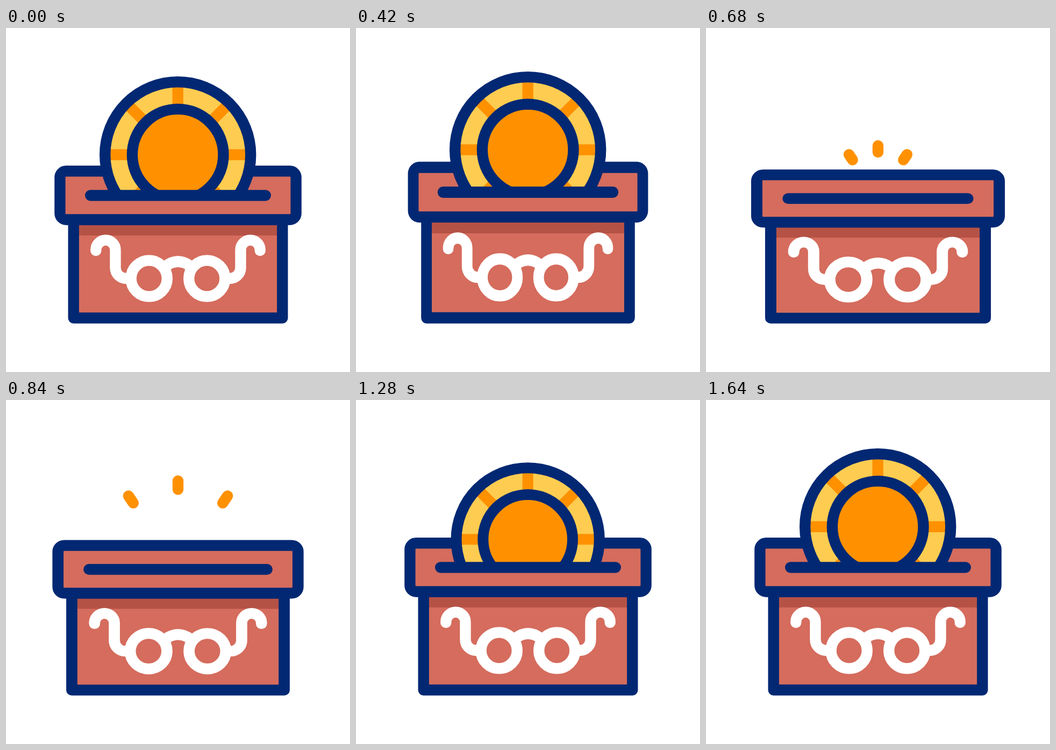
These frames come from a looping animation (640 px wide and 640 px high, 2.08 s). An HTML page with a canvas:

```html
<!DOCTYPE html>
<html lang="en">
<head>
<meta charset="utf-8">
<title>Donation box</title>
<style>
html, body { margin: 0; width: 100%; height: 100%; overflow: hidden; background: #fff; }
canvas { display: block; width: 640px; height: 640px; }
</style>
</head>
<body>
<canvas id="stage" width="640" height="640"></canvas>
<script>
const ctx = document.getElementById('stage').getContext('2d');
const LOOP = 2080, STEP = 20;
const NAVY = '#022873', RED = '#d56c5d', SHADE = '#b55246', ORANGE = '#ff9100', YELLOW = '#fecc50';
const MID = 320, BASE = 549.7, SLOT = 311.5;

const linear = p => p;
const sine = p => (1 - Math.cos(Math.PI * p)) / 2;
const cubicIn = p => p ** 3;

// Keys are [time, value, easing towards this key].
function track(keys, t) {
  const i = keys.findIndex(k => t < k[0]);
  if (i < 0) return keys[keys.length - 1][1];
  if (i === 0) return keys[0][1];
  const [t0, v0] = keys[i - 1], [t1, v1, ease = sine] = keys[i];
  return v0 + (v1 - v0) * ease((t - t0) / (t1 - t0));
}

const squash = [[200, 0], [380, -.038], [540, .031], [620, .031], [1100, 0, linear],
  [1284, 0], [1450, -.012], [1640, 0]];
const coinY = [[200, 235.7], [380, 204.7], [600, 480.7], [1054, 62, () => 0],
  [1284, 270, cubicIn], [1450, 219], [1640, 235.7]];
const coinSize = [[600, 1], [1054, 0, () => 0], [1284, 1, linear]];
const sparkTip = [[620, 85], [860, 167]];
const sparkTail = [[680, 85], [910, 167]];

const glasses = new Path2D(
  'M167.3 414V412.7a18.1 18.1 0 0 1 36.2 0V446a20 20 0 0 0 20 20H232' +
  'M472.7 414V412.7a18.1 18.1 0 0 0-36.2 0V446a20 20 0 0 1-20 20H408' +
  'M297 443Q320 426 343 443' +
  'M299.8 466a33.6 33.6 0 1 1-67.2 0a33.6 33.6 0 1 1 67.2 0Z' +
  'M407.4 466a33.6 33.6 0 1 1-67.2 0a33.6 33.6 0 1 1 67.2 0Z');

function paint(path, fill, stroke) {
  if (fill) { ctx.fillStyle = fill; ctx.fill(path); }
  if (stroke) { ctx.strokeStyle = stroke; ctx.stroke(path); }
}

function shape(build) {
  const path = new Path2D();
  build(path);
  return path;
}

const line = (x0, y0, x1, y1) => shape(p => { p.moveTo(x0, y0); p.lineTo(x1, y1); });
const disc = r => shape(p => p.arc(0, 0, r, 0, 2 * Math.PI));
const body = shape(p => p.rect(125.7, 356.5, 388.6, 183));
const shadow = shape(p => p.rect(135, 360, 370, 26));
const lid = shape(p => p.roundRect(100.4, 266.3, 439.2, 90.2, 11.5));
const slot = line(157.2, SLOT, 482.8, SLOT);

function scoped(draw) {
  ctx.save();
  draw();
  ctx.restore();
}

function drawSparks(t) {
  const tip = track(sparkTip, t), tail = track(sparkTail, t);
  if (tip - tail < .5) return;
  for (const angle of [-.59, 0, .59]) scoped(() => {
    ctx.translate(MID, 316);
    ctx.rotate(angle);
    paint(line(0, -tail, 0, -tip), null, ORANGE);
  });
}

function drawCoin(y, size, floor) {
  if (size <= 0) return;
  scoped(() => {
    ctx.beginPath();
    ctx.rect(0, 0, 640, floor);
    ctx.clip();
    ctx.translate(317.6 + 2.1 * size, y);
    ctx.scale(size, size);
    paint(disc(135.5), YELLOW);
    for (let i = 0; i < 4; i++) {
      const x = 128 * Math.cos(i * Math.PI / 4), dy = 128 * Math.sin(i * Math.PI / 4);
      paint(line(-x, -dy, x, dy), null, ORANGE);
    }
    paint(disc(135.5), null, NAVY);
    paint(disc(84.8), ORANGE, NAVY);
  });
}

function draw(t) {
  const k = track(squash, t), sy = 1 - .9 * k;
  const inBox = paintParts => scoped(() => {
    ctx.translate(MID, BASE);
    ctx.scale(1 + k, sy);
    ctx.translate(-MID, -BASE);
    paintParts();
  });
  ctx.fillStyle = '#fff';
  ctx.fillRect(0, 0, 640, 640);
  ctx.lineWidth = 20.4;
  ctx.lineCap = ctx.lineJoin = 'round';

  drawSparks(t);
  inBox(() => {
    paint(body, RED);
    paint(shadow, SHADE);
    paint(body, null, NAVY);
    paint(glasses, null, '#fff');
    paint(lid, RED, NAVY);
  });
  drawCoin(track(coinY, t), track(coinSize, t), BASE - (BASE - SLOT) * sy);
  inBox(() => paint(slot, null, NAVY));
}

const start = performance.now();
function frame() {
  const t = (performance.now() - start) % LOOP;
  draw(Math.floor(t / STEP) * STEP);
  requestAnimationFrame(frame);
}
frame();
</script>
</body>
</html>
```
